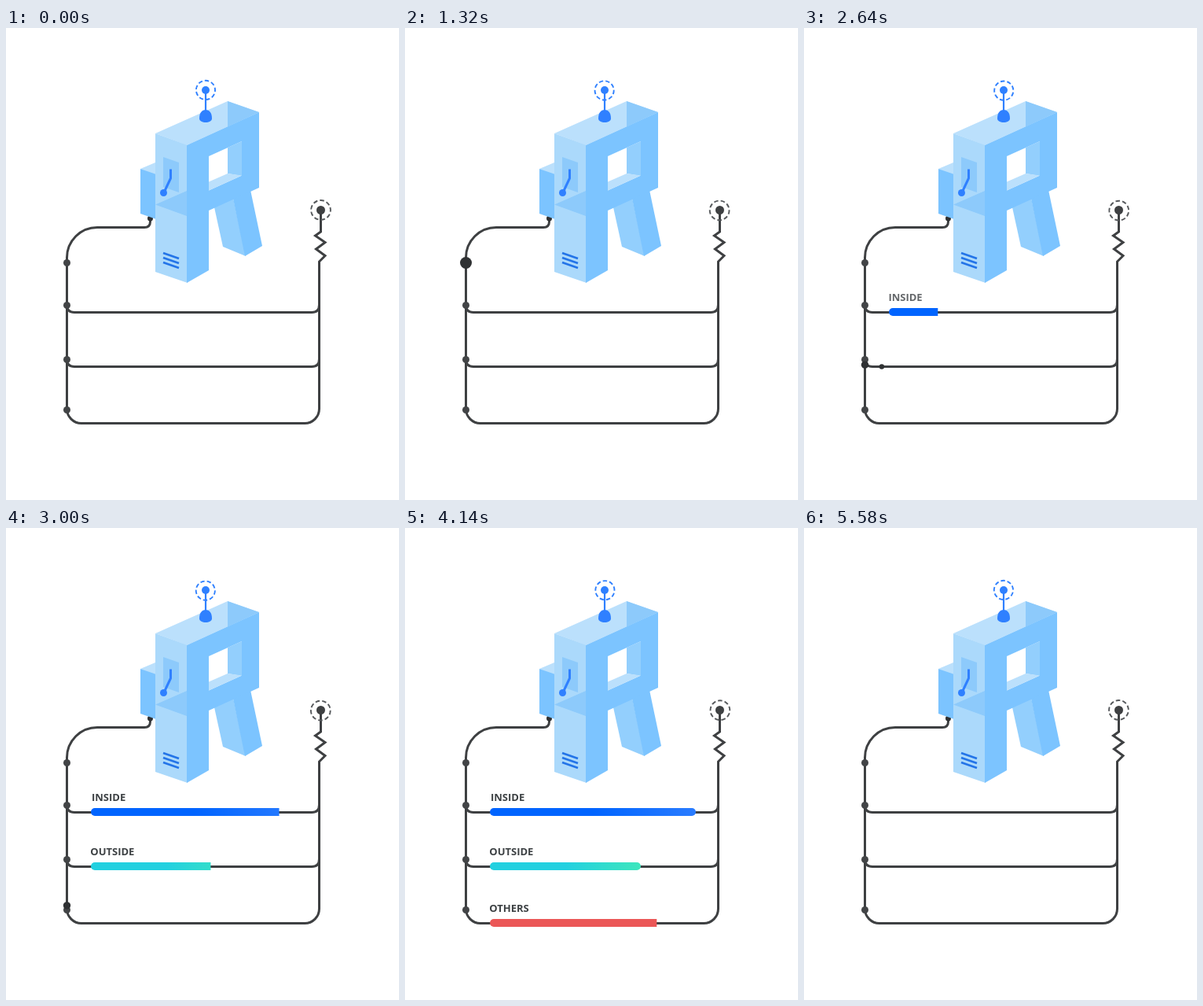
Write an HTML page with a canvas that moves like this. It is 500 px wide and 600 px high and loops after 5.64 s.

```html
<!DOCTYPE html>
<html lang="en">
<head>
<meta charset="utf-8">
<title>Signal bars</title>
<style>
html, body { margin: 0; width: 100%; height: 100%; overflow: hidden; background: #fff; }
canvas { display: block; width: 500px; height: 600px; }
</style>
</head>
<body>
<canvas id="stage" width="500" height="600"></canvas>
<script>
const ctx = document.getElementById('stage').getContext('2d');
const LOOP = 5640, STEP = 60;
const INK = '#3e4042', DARK = '#2f3133', BLUE = '#2f80ff';
const FRONT = '#7cc4ff', SIDE = '#abd9fb', TOP = '#bbe0fc', SHADE = '#8dcafb', INNER = '#93cffd';

const progress = (t, a, b) => Math.min(1, Math.max(0, (t - a) / (b - a)));
const ease = u => 0.5 - 0.5 * Math.cos(Math.PI * u);
const linear = u => u;

function poly(color, ...p) {
  ctx.fillStyle = color;
  ctx.beginPath();
  for (let i = 0; i < p.length; i += 2) ctx.lineTo(p[i], p[i + 1]);
  ctx.closePath();
  ctx.fill();
}

function disc(x, y, r, color) {
  ctx.fillStyle = color;
  ctx.beginPath();
  ctx.arc(x, y, r, 0, 7);
  ctx.fill();
}

function stroke(d, color, width) {
  ctx.strokeStyle = color;
  ctx.lineWidth = width;
  ctx.stroke(new Path2D(d));
}

function route(d) {
  const el = document.createElementNS('http://www.w3.org/2000/svg', 'path');
  el.setAttribute('d', d);
  const length = el.getTotalLength();
  return u => el.getPointAtLength(u * length);
}

const trunk = 'M183.5 243V246Q183.5 253.5 176 253.5H116A38.5 38.5 0 0 0 77.5 292V';
const branch = y => `M77.5 ${y - 9.5}Q77.5 ${y} 87 ${y}H`;
const corner = 'M77.5 484A18.5 18.5 0 0 0 96 502.5H';

// travelling dots: route, start, end, easing, radius
const dots = [
  [route(trunk + 298), 0, 1260, linear, 3.7],
  [route('M77.5 298V352'), 1320, 1830, ease, 4],
  [route('M77.5 352V421'), 1860, 2390, ease, 4],
  [route('M77.5 421V485'), 2510, 3110, ease, 4.7],
  [route(branch(361.5) + 108), 1860, 2400, linear, 3.2],
  [route(branch(430.5) + 108), 2460, 2700, linear, 3.2],
  [route(corner + 108), 3080, 3690, linear, 3.2]
];

// junctions: y, pulse start, growth
const nodes = [[298.5, 1220, 3], [352.5, 1820, 2.2], [421.5, 2420, 2.2], [485.5, 3050, 2.2]];

const bars = [
  { name: 'INSIDE', x: 109, y: 361, w: 262, grow: [2400, 3140], shrink: [4343, 5257], fade: 5140, colors: ['#0064ff', '#2a7cff'] },
  { name: 'OUTSIDE', x: 107.3, y: 430, w: 192, grow: [2650, 3150], shrink: [4572, 5486], fade: 5250, colors: ['#22d0e0', '#3de6bd'] },
  { name: 'OTHERS', x: 107.3, y: 502, w: 221, grow: [3660, 4210], shrink: [4965, 5540], fade: 5320, colors: ['#eb5757', '#eb5757'] }
];

function drawWires() {
  ctx.lineJoin = 'miter';
  stroke(trunk + '484', INK, 3);
  stroke(corner + '380A18.5 18.5 0 0 0 398.5 484V297L406 289.5L394.5 281L406 272.5L393.5 264L400.5 259V232', INK, 3);
  for (const y of [361.5, 430.5]) stroke(branch(y) + `389Q398.5 ${y} 398.5 ${y - 9.5}`, INK, 3);
  disc(400.5, 231.5, 5.5, INK);
}

function drawRobot() {
  disc(183.5, 242, 3.5, DARK);
  poly(TOP, 171, 179, 190, 171, 190, 187);
  poly(FRONT, 171, 179, 191, 186, 191, 243, 171, 236);

  poly(INNER, 265, 228, 289, 216, 305, 290, 276, 278);
  poly(FRONT, 289, 217, 311, 206, 326, 277, 304, 290);

  poly(TOP, 190, 134, 282, 93, 322, 107, 230, 149);
  poly(SHADE, 282, 93, 322, 107, 282, 125.5);
  poly(SIDE, 190, 134, 231, 149, 231, 324, 190, 310);
  poly(SHADE, 190, 224.5, 230, 207, 230, 239);

  poly(FRONT, 230, 149, 322, 107, 322, 203, 258, 232, 258, 308, 230, 324);
  poly('#fff', 258, 163, 300, 144, 300, 187.5, 258, 206.5);
  poly(INNER, 282, 152, 300, 144, 300, 188, 282, 185);
  poly(TOP, 258, 195.5, 282, 185, 300, 187.5, 258, 206.5);

  poly(SHADE, 200, 164, 220, 171, 220, 209, 200, 202);
  ctx.lineJoin = 'round';
  stroke('M209.5 179.5V191L201 209', BLUE, 3);
  disc(200.5, 209.5, 4.5, BLUE);
  for (const y of [286, 292, 298]) stroke(`M200 ${y}L220 ${y + 7}`, '#2374e8', 2.7);

  stroke('M254 80V108', BLUE, 2.2);
  disc(254, 79, 5, BLUE);
  ctx.fillStyle = BLUE;
  ctx.fill(new Path2D('M246 115C246 108 249 104 254 104S262 108 262 115C262 118.5 258 120 254 120S246 118.5 246 115Z'));
}

function drawRing(x, y, r, color, turn) {
  const arc = Math.PI * 2 / 9;
  ctx.strokeStyle = color;
  ctx.lineWidth = 1.9;
  ctx.save();
  ctx.translate(x, y);
  ctx.rotate(turn);
  for (let i = 0; i < 9; i++) {
    const a = Math.PI / 2 + i * arc;
    ctx.beginPath();
    ctx.arc(0, -0.4, r, a - arc * 0.64, a);
    ctx.stroke();
  }
  ctx.restore();
}

function drawSignals(t) {
  for (const [y, start, growth] of nodes) {
    const k = Math.sin(Math.PI * progress(t, start, start + 200));
    disc(77.5, y, 4.5 + growth * k, k > 0.01 ? DARK : '#424446');
  }
  for (const [at, a, b, curve, r] of dots) {
    if (t <= a || t >= b) continue;
    const p = at(curve(progress(t, a, b)));
    disc(p.x, p.y, r, DARK);
  }
}

function drawBar(bar, t) {
  const shown = ease(progress(t, ...bar.grow)) - ease(progress(t, ...bar.shrink));
  if (shown > 0.001) {
    const fill = ctx.createLinearGradient(108, 0, 108 + bar.w, 0);
    fill.addColorStop(0.5, bar.colors[0]);
    fill.addColorStop(1, bar.colors[1]);
    ctx.save();
    ctx.beginPath();
    ctx.rect(108, bar.y - 5, bar.w * shown, 10);
    ctx.clip();
    ctx.fillStyle = fill;
    ctx.beginPath();
    ctx.roundRect(108, bar.y - 5, bar.w, 10, 5);
    ctx.fill();
    ctx.restore();
  }
  const start = bar.grow[0];
  const alpha = progress(t, start, start + 300) - progress(t, bar.fade, bar.fade + 230);
  if (alpha <= 0) return;
  ctx.globalAlpha = alpha;
  ctx.fillStyle = '#3c4043';
  ctx.font = '700 13px "Open Sans", "Noto Sans", sans-serif';
  ctx.fillText(bar.name, bar.x - 8 * (1 - alpha), bar.y - 14);
  ctx.globalAlpha = 1;
}

function draw(t) {
  ctx.fillStyle = '#fff';
  ctx.fillRect(0, 0, 500, 600);
  drawWires();
  drawSignals(t);
  drawRobot();
  const turn = t / LOOP * 6 * Math.PI;
  drawRing(254, 79.3, 12.1, BLUE, turn);
  drawRing(400.5, 231.8, 12.4, '#55585b', turn);
  for (const bar of bars) drawBar(bar, t);
}

const began = performance.now();
function tick() {
  const t = (performance.now() - began) % LOOP;
  draw(Math.floor(t / STEP) * STEP);
  requestAnimationFrame(tick);
}
tick();
</script>
</body>
</html>
```
